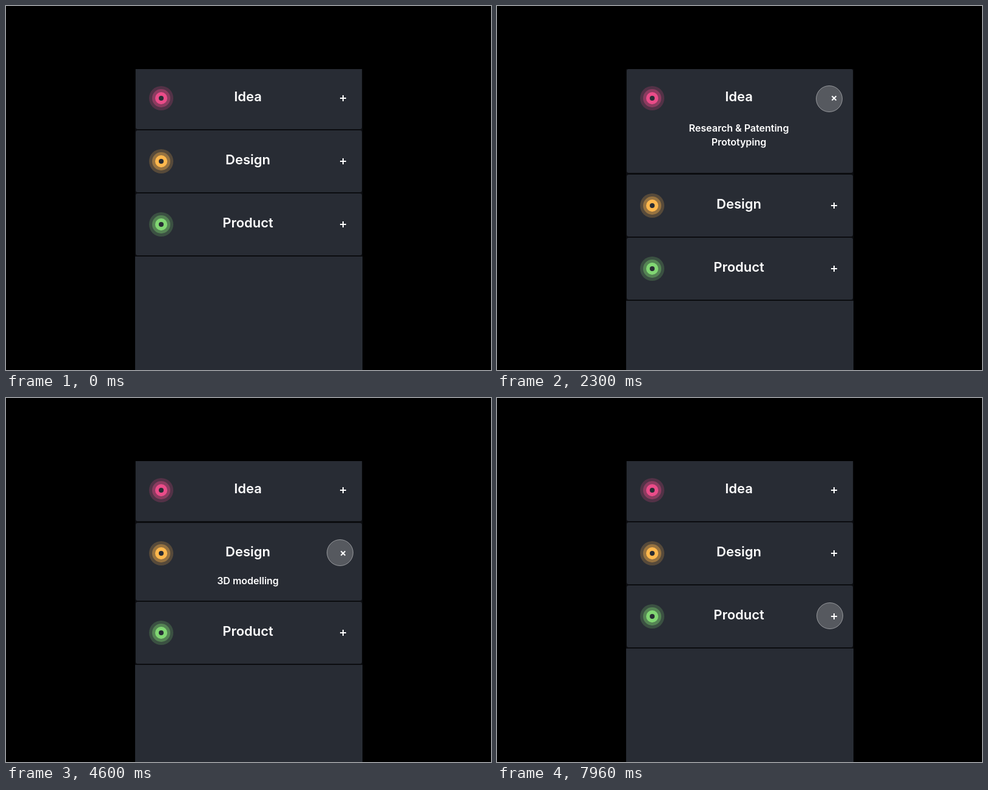
Recreate the animation shown at these times as an HTML page. Size 800 by 600 pixels, loop 8 s.

```html
<!DOCTYPE html>
<html lang="en">
<head>
<meta charset="utf-8">
<title>Accordion</title>
<style>
html, body { margin: 0; width: 100%; height: 100%; overflow: hidden; background: #000; }
svg { display: block; width: 800px; height: 600px; }
text { font-family: Inter, "Liberation Sans", sans-serif; font-weight: 600; fill: #fff; text-anchor: middle; }
.title { font-size: 22px; }
.sub { font-size: 16px; }
</style>
</head>
<body>
<svg id="stage" viewBox="0 0 800 600">
  <defs><clipPath id="view"><rect x="0" y="104" width="800" height="496"/></clipPath></defs>
  <rect width="800" height="600" fill="#000"/>
  <g id="list" clip-path="url(#view)"></g>
  <circle id="cursor" fill="#fff" stroke="#fff"/>
</svg>
<script>
const LOOP = 8000, PANEL = '#282c34', EDGE = '#0b0c0f', ROW = 104, TOP = 100, OPEN_MS = 320;
const list = document.getElementById('list');
const cursor = document.getElementById('cursor');

// grow: extra height when open; open / close: start times of the toggles
const items = [
  { title: 'Idea', color: '#ea4c89', lines: ['Research & Patenting', 'Prototyping'], textY: 107, grow: 73, open: 1780, close: 2980 },
  { title: 'Design', color: '#ffb84d', lines: ['3D modelling'], textY: 103, grow: 27, open: 4270, close: 5340 },
  { title: 'Product', color: '#81d773', lines: ['Manufacturing', 'Distribution'], textY: 105, grow: 63, open: 6540, close: 7640 }
];

// press down start, down end, release start, release end
const presses = [
  [1500, 1600, 1720, 1820],
  [2900, 2960, 2980, 3060],
  [4020, 4120, 4200, 4300],
  [5300, 5360, 5380, 5460],
  [6320, 6420, 6500, 6590]
];

function add(parent, name, attrs, text) {
  const el = document.createElementNS('http://www.w3.org/2000/svg', name);
  set(el, attrs);
  if (text) el.textContent = text;
  parent.appendChild(el);
  return el;
}

function set(el, attrs) {
  for (const key in attrs) el.setAttribute(key, attrs[key]);
}

const clamp = v => Math.min(1, Math.max(0, v));
const span = (t, a, b) => clamp((t - a) / (b - a));
const mix = (a, b, p) => a + (b - a) * p;
const wave = p => (1 - Math.cos(Math.PI * p)) / 2;
const outQuad = p => 1 - (1 - p) ** 2;
const inOutCubic = p => p < 0.5 ? 4 * p ** 3 : 1 - 4 * (1 - p) ** 3;

// cubic-bezier(.25, .1, .25, 1)
function ease(p) {
  let lo = 0, hi = 1, u = p;
  for (let i = 0; i < 18; i++) {
    u = (lo + hi) / 2;
    const x = 0.75 * u * (1 - u) + u ** 3;
    if (x < p) lo = u; else hi = u;
  }
  return p <= 0 ? 0 : p >= 1 ? 1 : 0.3 * u * (1 - u) ** 2 + 3 * u * u * (1 - u) + u ** 3;
}

const frame = add(list, 'rect', { x: 213, y: TOP, width: 375, fill: EDGE });
const rest = add(list, 'rect', { x: 213, width: 375, height: 600, fill: PANEL });

items.forEach((item, i) => {
  const g = item.group = add(list, 'g', {});
  item.card = add(g, 'rect', { x: 214, width: 373, rx: 3, fill: PANEL });
  [[20, 0.22], [15, 0.38], [10, 1]].forEach(([r, opacity]) =>
    add(g, 'circle', { cx: 256, cy: 52, r, fill: item.color, 'fill-opacity': opacity }));
  add(g, 'circle', { cx: 256, cy: 52, r: 4, fill: PANEL });
  add(g, 'text', { x: 399, y: 57, class: 'title' }, item.title);
  const clip = add(g, 'clipPath', { id: 'clip' + i });
  item.mask = add(clip, 'rect', { x: 214, y: 0, width: 373 });
  item.body = add(g, 'g', { 'clip-path': `url(#clip${i})` });
  item.lines.forEach((line, n) =>
    add(item.body, 'text', { x: 399, y: item.textY + 23 * n, class: 'sub' }, line));
  item.sign = add(g, 'path', { d: 'M-5 0H5M0-5V5', stroke: '#fff', 'stroke-width': 2, fill: 'none' });
});

function cursorAt(t) {
  if (t < 1480) {
    return [
      t < 1180 ? mix(824, 527, wave(span(t, 660, 1180))) : mix(527, 548, wave(span(t, 1180, 1480))),
      t < 1060 ? mix(194, 109, wave(span(t, 660, 1060))) : mix(109, 153, wave(span(t, 1060, 1480)))
    ];
  }
  const a = outQuad(span(t, 3460, 3885));
  const b = inOutCubic(span(t, 5780, 6300));
  return [548 + 3 * a - 2 * b, 153 + 56 * a / 0.55 + 104 * b - (56 / 0.55 - 102) * a];
}

function draw(t) {
  let y = TOP;
  items.forEach((item, i) => {
    const p = ease(span(t, item.open, item.open + OPEN_MS)) - ease(span(t, item.close, item.close + OPEN_MS));
    const height = ROW + item.grow * p;
    const top = 1 + (i ? 1 : 3) * p;
    const bottom = height - 1 - (i ? 0 : p);
    set(item.group, { transform: `translate(0 ${y})` });
    set(item.card, { y: top, height: bottom - top });
    set(item.mask, { height: bottom });
    set(item.body, { opacity: p });
    set(item.sign, { transform: `translate(556 52) rotate(${45 * p})` });
    y += height;
  });
  set(frame, { height: y + 1 - TOP });
  set(rest, { y: y + 1 });

  const down = presses.reduce((d, [a, b, c, e]) => Math.max(d, span(t, a, b) - span(t, c, e)), 0);
  const [cx, cy] = cursorAt(t);
  set(cursor, {
    cx, cy,
    r: mix(21.5, 20.5, down),
    'fill-opacity': mix(0.21, 0.61, down),
    'stroke-opacity': mix(0.45, 0.3, down)
  });
}

function tick() {
  draw((performance.now() - start) % LOOP);
  requestAnimationFrame(tick);
}

const start = performance.now();
tick();
</script>
</body>
</html>
```
